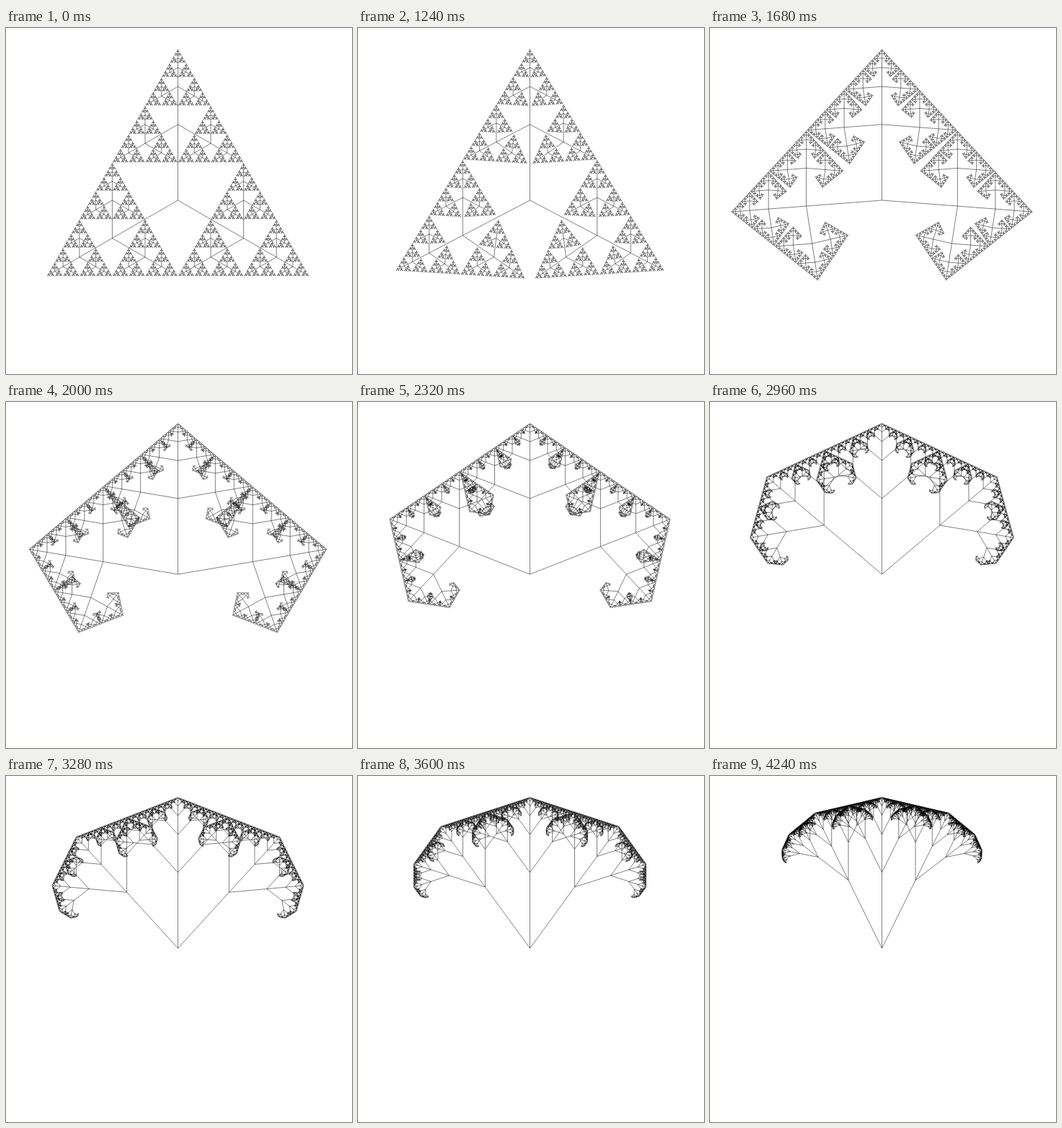
Recreate the animation shown at these times as an HTML page with a canvas. Size 480 px wide and 480 px high, loop 5.92 s.

```html
<!DOCTYPE html>
<html lang="en">
<head>
<meta charset="utf-8">
<title>Folding three-way tree</title>
<style>
  html, body { margin: 0; width: 100%; height: 100%; overflow: hidden; background: #fff; }
  canvas { display: block; }
</style>
</head>
<body>
<canvas id="stage" width="480" height="480"></canvas>
<script>
const ctx = document.getElementById('stage').getContext('2d');
const LOOP = 5920, STEP = 40, FIRST_STEP = 30, STEPS = 76;
const ROOT = { x: 238.5, y: 239 }, LENGTH = 105.2, DEPTH = 8;

// Each node grows three half-length branches: left, straight and right.
// Hairlines are stroked one by one, so they darken where they crowd together.
function grow(x, y, heading, spread, length, depth) {
  if (depth === 0) return;
  for (let side = -1; side <= 1; side++) {
    const angle = heading + side * spread;
    const endX = x + length * Math.sin(angle);
    const endY = y - length * Math.cos(angle);
    ctx.beginPath();
    ctx.moveTo(x, y);
    ctx.lineTo(endX, endY);
    ctx.stroke();
    grow(endX, endY, angle, spread, length / 2, depth - 1);
  }
}

function draw(step) {
  const spread = 2 * Math.PI / 3 * Math.exp(-0.02 * step);
  ctx.fillStyle = '#fff';
  ctx.fillRect(0, 0, 480, 480);
  ctx.strokeStyle = '#000';
  ctx.lineWidth = 0.5;
  grow(ROOT.x, ROOT.y, 0, spread, LENGTH, DEPTH);
}

const start = performance.now();
let shown = -1;

function frame() {
  const time = (performance.now() - start) % LOOP;
  const step = Math.min(STEPS, Math.max(0, Math.floor(time / STEP) - FIRST_STEP));
  if (step !== shown) draw(shown = step);
  requestAnimationFrame(frame);
}
frame();
</script>
</body>
</html>
```
